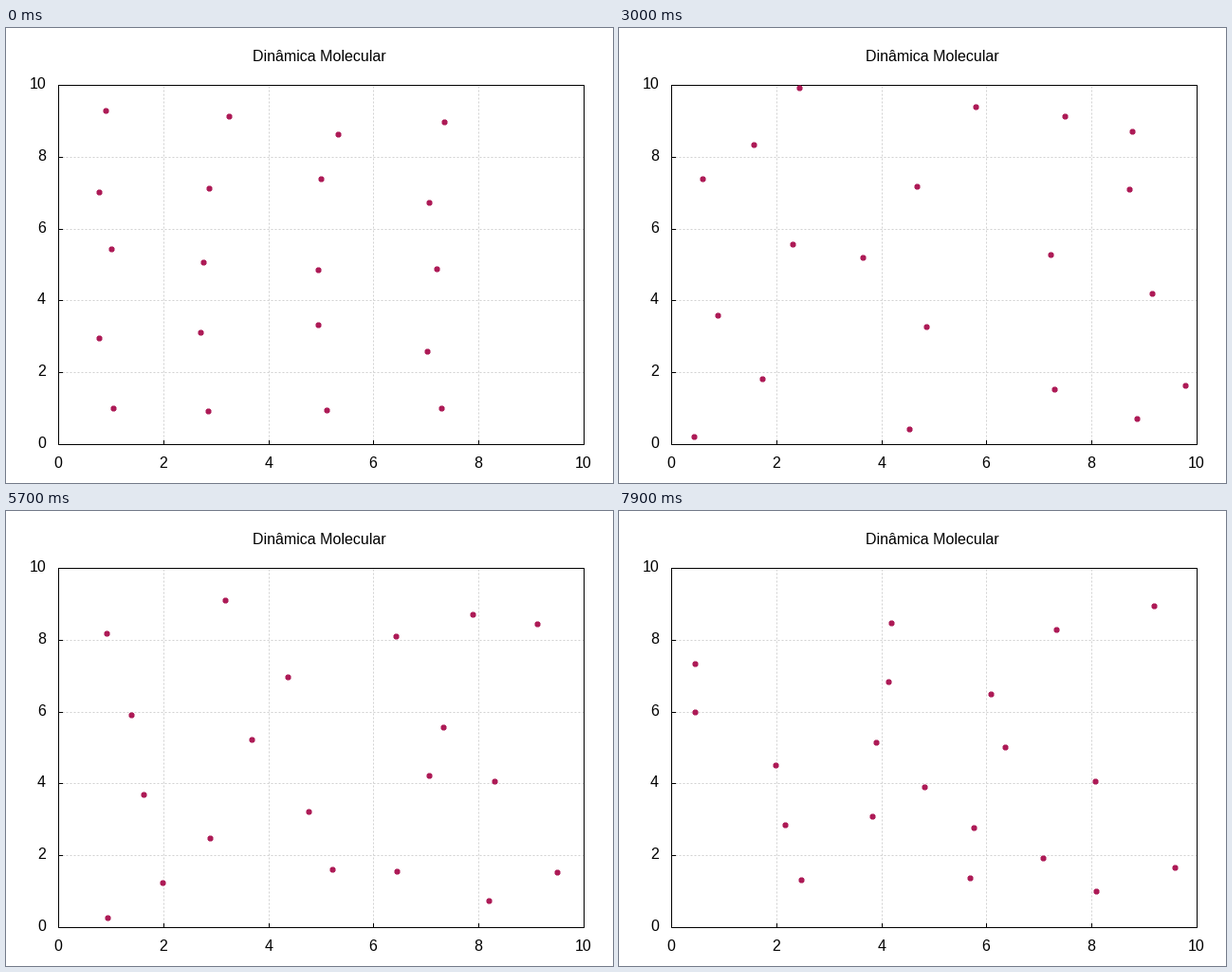
A matplotlib script that plays this animation: 640x480 px, repeating every 8 s.

```python
import numpy as np
import matplotlib.pyplot as plt
from matplotlib.animation import FuncAnimation

FRAMES, STEP = 80, 100
SUB = 10                               # integration steps per frame
BOX = 10.0
X0, X1, Y0, Y1 = 55, 609, 60, 439      # plot box in pixels
ORIGIN = np.array([X0, Y0])
SCALE = np.array([X1 - X0, Y1 - Y0]) / BOX
PX = 0.9                               # one pixel in points at 80 dpi
DOT, GRID = "#ad1a56", "#d2d2d2"
PUSH = 0.16                            # repulsion at unit distance

# Start x, y and drift per second, in pixels.
START = np.array([
    (105, 87, -13, -25), (235, 93, 24, -18), (350, 112, 34, -3), (462, 99, 29, 9),
    (98, 173, -29, 6), (214, 169, -26, -14), (332, 159, -3, -3), (446, 184, 9, 26),
    (111, 233, 6, -29), (208, 247, -32, -16), (329, 255, -24, -3), (454, 254, 30, 1),
    (98, 327, -17, 19), (205, 321, -34, -6), (329, 313, -2, -1), (444, 341, 11, 21),
    (113, 401, 11, 1), (213, 404, -12, 12), (338, 403, 13, 22), (459, 401, 35, -2),
], float)


def accel(p):
    """Short-range repulsion between all pairs, nearest periodic image."""
    d = p[:, None] - p[None]
    d -= BOX * np.round(d / BOX)
    r2 = (d ** 2).sum(-1)
    np.fill_diagonal(r2, np.inf)
    return (PUSH * d / r2[..., None] ** 7).sum(1)


def simulate():
    """Velocity Verlet; returns pixel positions for every frame."""
    p = (START[:, :2] - ORIGIN) / SCALE
    v = START[:, 2:] / SCALE / 10
    a, dt, out = accel(p), 1 / SUB, []
    for _ in range(FRAMES):
        out.append(np.round(ORIGIN + p % BOX * SCALE))
        for _ in range(SUB):
            v = v + a * dt / 2
            p = p + v * dt
            a = accel(p)
            v = v + a * dt / 2
    return out


track = simulate()

plt.rcParams["font.family"] = "Liberation Sans"
fig = plt.figure(figsize=(8, 6), dpi=80, facecolor="white")
ax = fig.add_axes([0, 0, 1, 1])
ax.set_xlim(0, 640)
ax.set_ylim(480, 0)
ax.axis("off")


def line(xs, ys, color="black", **kw):
    ax.plot(xs, ys, color=color, lw=PX, solid_capstyle="projecting",
            dash_capstyle="butt", **kw)


def label(x, y, s, ha="center"):
    ax.text(x, y, s, fontsize=16 * PX, ha=ha, va="baseline", color="black")


for k in range(6):
    gx = round(X0 + (X1 - X0) * k / 5)
    gy = round(Y1 - (Y1 - Y0) * k / 5)
    if 0 < k < 5:
        line([gx, gx], [Y1, Y0], GRID, ls=(0, (2, 2)), zorder=1)
        line([X0, X1], [gy, gy], GRID, ls=(0, (2, 2)), zorder=1)
        line([gx, gx], [Y1, Y1 - 4])
        line([X0, X0 + 4], [gy, gy])
    label(gx, 464, str(2 * k))
    label(42, gy + 4, str(2 * k), "right")

line([X0, X1, X1, X0, X0], [Y0, Y0, Y1, Y1, Y0])
label(330, 35, "Dinâmica Molecular")

# A small block with softened tips makes a round dot.
core, = ax.plot([], [], "s", color=DOT, ms=4 * PX, mew=PX, zorder=5)
tips, = ax.plot([], [], "+", color=DOT, ms=6 * PX, mew=3 * PX, zorder=5)


def draw(i):
    for art in (core, tips):
        art.set_data(*track[i].T)
    return core, tips


anim = FuncAnimation(fig, draw, frames=FRAMES, interval=STEP,
                     repeat=True, repeat_delay=0)
plt.show()
```
